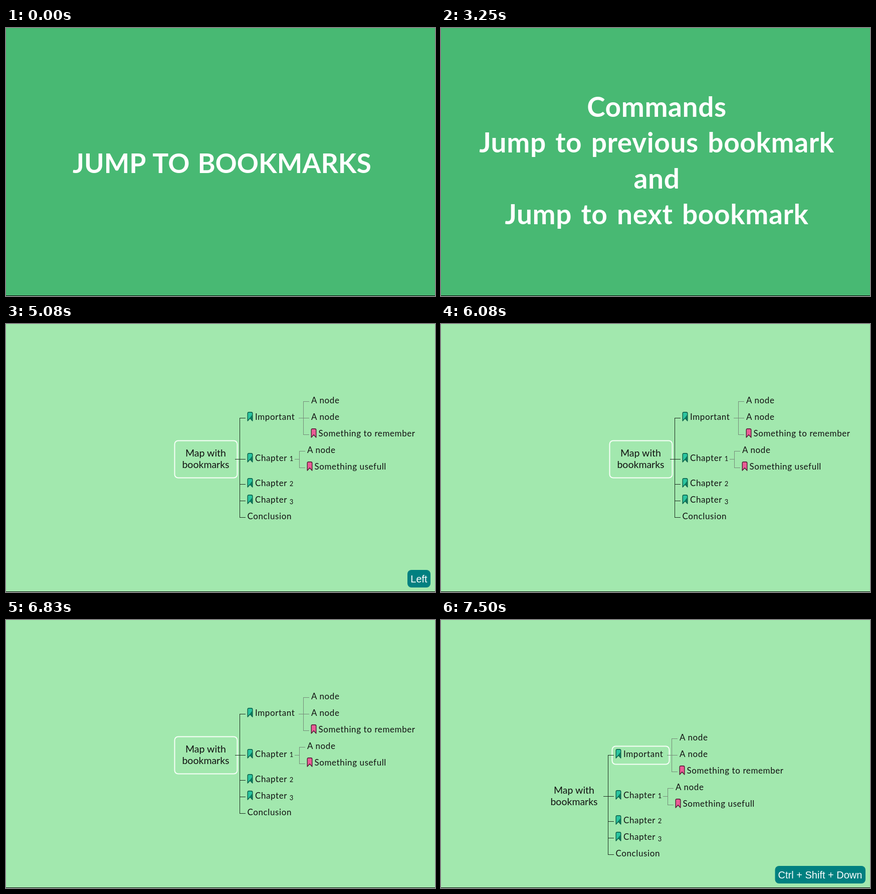
An HTML page without scripts that plays this animation: 856 by 534 pixels, repeating every 8 s.

```html
<!DOCTYPE html>
<html lang="en">
<head>
<meta charset="utf-8">
<title>Jump to bookmarks</title>
<style>
  html, body { margin: 0; width: 100%; height: 100%; overflow: hidden; background: #48b973; }
  svg { display: block; width: 856px; height: 534px; }

  .card { font: 700 55px Lato, sans-serif; letter-spacing: .6px; word-spacing: 4.5px; fill: #fff; text-anchor: middle; }
  .title { font-size: 53.5px; letter-spacing: 0; word-spacing: 3px; }
  .node { font: 17px Lato, sans-serif; letter-spacing: .6px; fill: #111; }
  .digit { font-size: 13px; }
  .root { font: 19.5px Lato, sans-serif; text-anchor: middle; fill: #111; }
  .branch, .twig { fill: none; stroke: #1c2c1f; shape-rendering: crispEdges; }
  .twig { stroke: #758c79; }
  .frame { fill: none; stroke: #f7fff8; stroke-width: 2; }
  .key { font: 20px "Liberation Sans", Arial, sans-serif; fill: #fff; text-anchor: middle; }
  .key rect { fill: #008080; }

  /* Hard cuts on a shared 8 s loop */
  .title, .commands, .scene, .map, .root-frame, .node-frame, .left, .combo {
    animation: 8s step-end infinite;
  }
  .title { animation-name: title; }
  .commands { animation-name: commands; }
  .scene { animation-name: scene; }
  .left { animation-name: left; }
  .combo { animation-name: combo; }
  .map { animation-name: pan; }
  .root-frame { animation-name: deselect; }
  .node-frame { animation-name: select; }

  @keyframes title { 0% { opacity: 1 } 6.25%, 100% { opacity: 0 } }
  @keyframes commands { 0% { opacity: 0 } 6.25% { opacity: 1 } 63.5%, 100% { opacity: 0 } }
  @keyframes scene { 0% { opacity: 0 } 63.5%, 100% { opacity: 1 } }
  @keyframes left { 0% { opacity: 1 } 76%, 100% { opacity: 0 } }
  @keyframes combo { 0% { opacity: 0 } 91.625%, 100% { opacity: 1 } }
  @keyframes pan { 0% { transform: none } 93.75%, 100% { transform: translate(-133px, 82px) } }
  @keyframes deselect { 0% { opacity: 1 } 93.75%, 100% { opacity: 0 } }
  @keyframes select { 0% { opacity: 0 } 93.75%, 100% { opacity: 1 } }
</style>
</head>
<body>
<svg viewBox="0 0 856 534">
  <defs>
    <path id="ribbon" d="M.7 18V3.2Q.7.7 3.2.7H7.8Q10.3.7 10.3 3.2V18L5.5 12.8Z" stroke-width="1.4" stroke-linejoin="round"/>
    <g id="green">
      <use href="#ribbon" fill="#2cc5a0" stroke="#075c46"/>
      <path d="M1.4 16.5L9.6 6V16.2L5.5 11.8Z" fill="#0b7a5e"/>
    </g>
    <use id="pink" href="#ribbon" fill="#ea5c96" stroke="#4d1a30"/>
  </defs>

  <rect width="856" height="534" fill="#48b973"/>

  <text class="card title" x="431" y="289">JUMP TO BOOKMARKS</text>

  <g class="card commands">
    <text x="430.5" y="177">Commands</text>
    <text x="430.5" y="248">Jump to previous bookmark</text>
    <text x="430.5" y="320">and</text>
    <text x="430.5" y="391">Jump to next bookmark</text>
  </g>

  <g class="scene">
    <rect width="856" height="534" fill="#a2e8ae"/>

    <g class="map">
      <rect class="frame root-frame" x="336.5" y="232.5" width="125" height="74" rx="7"/>
      <rect class="frame node-frame" x="474.5" y="169.5" width="114" height="36" rx="7"/>

      <path class="branch" d="M478 187.5H466.5V385.5H478M457 269.5H478M466 319.5H478M466 352.5H478"/>
      <path class="twig" d="M605 154.5H593.5V220.5H605M584 187.5H605M597 253.5H585.5V286.5H597M576 269.5H585"/>

      <g class="root">
        <text x="398.5" y="264">Map with</text>
        <text x="398.5" y="287">bookmarks</text>
      </g>

      <use href="#green" x="481.5" y="175"/>
      <use href="#green" x="481.5" y="257"/>
      <use href="#green" x="481.5" y="307"/>
      <use href="#green" x="481.5" y="340"/>
      <use href="#pink" x="608.5" y="208"/>
      <use href="#pink" x="600.5" y="274"/>

      <g class="node">
        <text x="497" y="191">Important</text>
        <text x="497" y="273">Chapter <tspan class="digit">1</tspan></text>
        <text x="497" y="323">Chapter <tspan class="digit">2</tspan></text>
        <text x="497" y="356">Chapter <tspan class="digit" dy="3">3</tspan></text>
        <text x="481.5" y="389">Conclusion</text>
        <text x="609" y="158">A node</text>
        <text x="609" y="191">A node</text>
        <text x="623.5" y="224">Something to remember</text>
        <text x="601" y="257">A node</text>
        <text x="615.5" y="290">Something usefull</text>
      </g>
    </g>

    <g class="key left">
      <rect x="801" y="490" width="46" height="35" rx="8"/>
      <text x="824" y="515">Left</text>
    </g>
    <g class="key combo">
      <rect x="666.5" y="490" width="180.5" height="35" rx="8"/>
      <text x="756.5" y="515">Ctrl + Shift + Down</text>
    </g>
  </g>

  <rect y="533" width="856" height="1"/>
</svg>
</body>
</html>
```
